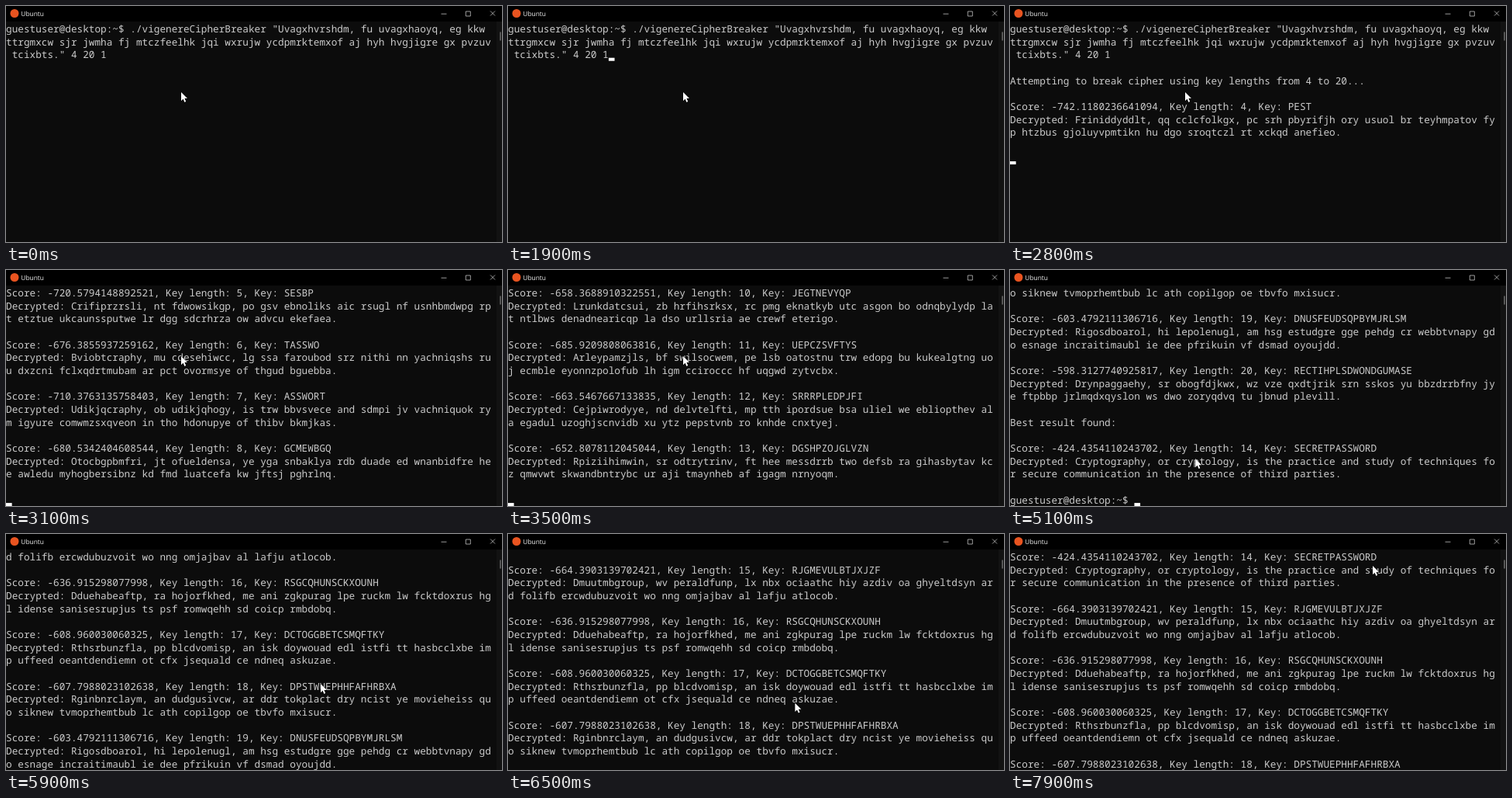
Write an HTML page with a canvas that moves like this. It is 640 px wide and 304 px high and loops after 8 s.

```html
<!DOCTYPE html>
<html lang="en">
<head>
<meta charset="utf-8">
<title>Terminal</title>
<style>
html, body { margin: 0; width: 100%; height: 100%; overflow: hidden; background: #0c0c0c; }
canvas { display: block; }
</style>
</head>
<body>
<canvas id="stage" width="640" height="304"></canvas>
<script>
const ctx = document.getElementById('stage').getContext('2d');
const COLS = 82, ROWS = 17, CELL = 7.64, LINE = 16.667, TOP = 21.5;
const PROMPT = 'guestuser@desktop:~$ ';
const CIPHER = 'Uvagxhvrshdm, fu uvagxhaoyq, eg kkw ttrgmxcw sjr jwmha fj mtczfeelhk ' +
  'jqi wxrujw ycdpmrktemxof aj hyh hvgjigre gx pvzuv tcixbts.';
const FIRST = 4, LAST = 20, BEST = 14;

// One entry per key length, starting at FIRST
const attempts = `-742.1180236641094 PEST
-720.5794148892521 SESBP
-676.3855937259162 TASSWO
-710.3763135758403 ASSWORT
-680.5342404608544 GCMEWBGQ
-689.2047713365182 SRCGETPAS
-658.3688910322551 JEGTNEVYQP
-685.9209808063816 UEPCZSVFTYS
-663.5467667133835 SRRRPLEDPJFI
-652.8078112045044 DGSHPZOJGLVZN
-424.4354110243702 SECRETPASSWORD
-664.3903139702421 RJGMEVULBTJXJZF
-636.915298077998 RSGCQHUNSCKXOUNH
-608.960030060325 DCTOGGBETCSMQFTKY
-607.7988023102638 DPSTWUEPHHFAFHRBXA
-603.4792111306716 DNUSFEUDSQPBYMJRLSM
-598.3127740925817 RECTIHPLSDWONDGUMASE`.split('\n').map(s => s.split(' '));

function decrypt(key) {
  let n = 0;
  return CIPHER.replace(/[a-z]/gi, c => {
    const base = c < 'a' ? 65 : 97;
    const shift = key.charCodeAt(n++ % key.length) - 65;
    return String.fromCharCode((c.charCodeAt(0) - base - shift + 26) % 26 + base);
  });
}

const wrap = text => text.match(new RegExp(`.{1,${COLS}}`, 'g'));

function result(length) {
  const [score, key] = attempts[length - FIRST];
  return [`Score: ${score}, Key length: ${length}, Key: ${key}`,
    ...wrap('Decrypted: ' + decrypt(key)), ''];
}

const command = wrap(`${PROMPT}./vigenereCipherBreaker "${CIPHER}" 4 20 1`);
const intro = [...command, '', 'Attempting to break cipher using key lengths from 4 to 20...', ''];
const summary = ['Best result found:', '', ...result(BEST), PROMPT];

// Terminal contents; the cursor sits at the end of the last line
function bufferAt(t) {
  if (t < 2100) return command;
  if (t < 2500) return [...command, ''];
  if (t < 2800) return [...intro, ''];
  const done = Math.min(LAST, Math.floor((t - 2800) / 80 + FIRST + .25));
  const lines = [...intro];
  for (let n = FIRST; n <= done; n++) lines.push(...result(n));
  return lines.concat(t < 4200 ? [''] : summary);
}

const wheelTimes = [5500, 5600, 5700, 5800, 6400, 6600];
const scrolledBack = t => 3 * wheelTimes.filter(w => t >= w).length;

// Pointer stops: time, x, y
const path = [
  [0, 226, 111], [4500, 226, 111], [4900, 41, 236], [5400, 604, 256], [5500, 590, 250],
  [5900, 406, 193], [6100, 395, 198], [6200, 395, 198], [7100, 300, 274],
  [7400, 96, 50], [7900, 468, 41], [8000, 468, 41]
];

function pointerAt(t) {
  const i = Math.max(1, path.findIndex(p => p[0] >= t));
  const [t0, x0, y0] = path[i - 1], [t1, x1, y1] = path[i];
  let k = (t - t0) / (t1 - t0);
  k = k * k * (3 - 2 * k);
  return [x0 + (x1 - x0) * k, y0 + (y1 - y0) * k];
}

function fill(color, x, y, w, h) {
  ctx.fillStyle = color;
  ctx.fillRect(x, y, w, h);
}

function drawWindow() {
  fill('#0c0c0c', 0, 0, 640, 304);
  fill('#121212', 633, 20, 7, 284);
  fill('#000', 0, 0, 640, 20);
  ctx.fillStyle = '#e95420';
  ctx.beginPath();
  ctx.arc(11, 9.5, 5.5, 0, 7);
  ctx.fill();
  ctx.fillStyle = '#eee';
  ctx.font = '8.4px "Open Sans", sans-serif';
  ctx.fillText('Ubuntu', 19.3, 13);
  ctx.strokeStyle = '#ddd';
  ctx.lineWidth = .7;
  ctx.stroke(new Path2D('M561.5 10.2h7M593.3 7h6v6h-6zM625 6.5l6 6m0-6l-6 6'));
  fill('#9a9a9a', 637.5, 33.5, 1, 11);
}

function drawTerminal(t) {
  const lines = bufferAt(t);
  const top = Math.max(0, lines.length - ROWS) - scrolledBack(t);
  ctx.font = `500 ${CELL / .6}px "Noto Sans Mono", monospace`;
  ctx.fillStyle = '#ccc';
  lines.slice(top, top + ROWS).forEach((line, row) =>
    ctx.fillText(line, 0, TOP + row * LINE + 12.5));
  const cursorOn = t >= 200 && t < 1100 || t >= 1900;
  const cursorRow = lines.length - 1;
  if (cursorOn && cursorRow < top + ROWS)
    fill('#fff', lines[cursorRow].length * CELL, TOP + (cursorRow - top) * LINE + 11.9, CELL, 4);
}

function drawPointer(t) {
  const [x, y] = pointerAt(t);
  const arrow = new Path2D('M0 0V11.2L2.6 8.8L4.4 12.9L6.2 12.1L4.5 8.1H8Z');
  ctx.save();
  ctx.translate(x, y);
  ctx.lineWidth = 1;
  ctx.strokeStyle = '#000';
  ctx.stroke(arrow);
  ctx.fillStyle = '#fff';
  ctx.fill(arrow);
  ctx.restore();
}

function draw(now) {
  const t = Math.floor(now % 8000 / 100) * 100;
  ctx.textRendering = 'geometricPrecision';
  drawWindow();
  drawTerminal(t);
  drawPointer(t);
  requestAnimationFrame(draw);
}
requestAnimationFrame(draw);
</script>
</body>
</html>
```
